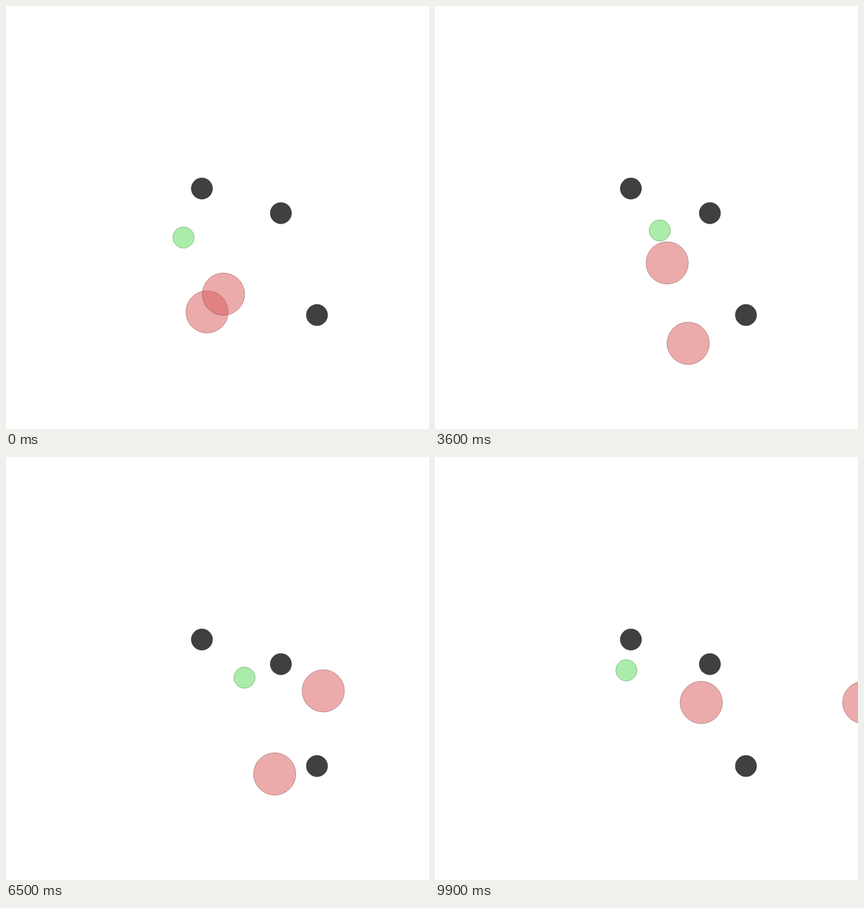
These frames come from a looping animation (700x700 px, 10000 ms). An HTML page with a canvas:

```html
<!DOCTYPE html>
<html>
<head>
<meta charset="utf-8">
<style>
html, body { margin: 0; width: 100%; height: 100%; overflow: hidden; background: #fff; }
canvas { display: block; }
</style>
</head>
<body>
<canvas id="stage" width="700" height="700"></canvas>
<script>
const ctx = document.getElementById('stage').getContext('2d');
const STEP = 100, STEPS = 100;

// Key points: step, x, y
const runner = [
  [0, 293.7, 383.2], [17, 330.7, 382.7], [36, 372, 371.5],
  [53, 395.5, 358], [75, 392.7, 370.5], [99, 316.7, 353]
];
const lowChaser = [
  [0, 332.7, 506.2], [6, 291, 547], [17, 360, 521], [30, 404, 584],
  [36, 419, 558.2], [53, 447.5, 527.5], [59, 449, 580], [65, 444.6, 524.5],
  [75, 423.6, 452.2], [99, 440.6, 406.2]
];
const highChaser = [
  [0, 359.9, 476.8], [8, 386, 443], [17, 368.5, 433.7], [36, 384.2, 425.2],
  [53, 528.2, 425.7], [58, 564, 411], [65, 525, 387], [75, 614.2, 371],
  [82, 680, 354], [99, 709.5, 406.2]
];
const obstacles = [[324.2, 302.1], [454.9, 342.8], [514.6, 511.4]];

// Slope at key i: harmonic mean, flat at turning points and at rest
function slope(path, i, axis) {
  const rise = k => (path[k + 1][axis] - path[k][axis]) / (path[k + 1][0] - path[k][0]);
  if (i === 0) return rise(0);
  if (i === path.length - 1) return 0;
  const a = rise(i - 1), b = rise(i);
  return a * b > 0 ? 2 * a * b / (a + b) : 0;
}

function position(path, step) {
  let i = 0;
  while (i < path.length - 2 && path[i + 1][0] <= step) i++;
  const p = path[i], q = path[i + 1], span = q[0] - p[0];
  const u = (step - p[0]) / span, v = 1 - u;
  return [1, 2].map(axis =>
    v * v * (1 + 2 * u) * p[axis] + u * u * (3 - 2 * u) * q[axis] +
    u * v * span * (v * slope(path, i, axis) - u * slope(path, i + 1, axis)));
}

// Filled disc with a rim of half the fill's brightness
function disc([x, y], radius, rgb, fillAlpha, rimAlpha) {
  ctx.beginPath();
  ctx.arc(x, y, radius, 0, 2 * Math.PI);
  ctx.fillStyle = `rgba(${rgb},${fillAlpha})`;
  ctx.fill();
  ctx.strokeStyle = `rgba(${rgb.map(c => c / 2)},${rimAlpha})`;
  ctx.stroke();
}

function draw() {
  const step = Math.floor(performance.now() / STEP) % STEPS;
  ctx.clearRect(0, 0, 700, 700);
  for (const path of [lowChaser, highChaser])
    disc(position(path, step), 35, [217, 89, 89], 0.5, 0.45);
  disc(position(runner, step), 17.5, [89, 217, 89], 0.5, 0.45);
  for (const spot of obstacles) disc(spot, 17.6, [64, 64, 64], 1, 0.6);
  requestAnimationFrame(draw);
}
draw();
</script>
</body>
</html>
```
